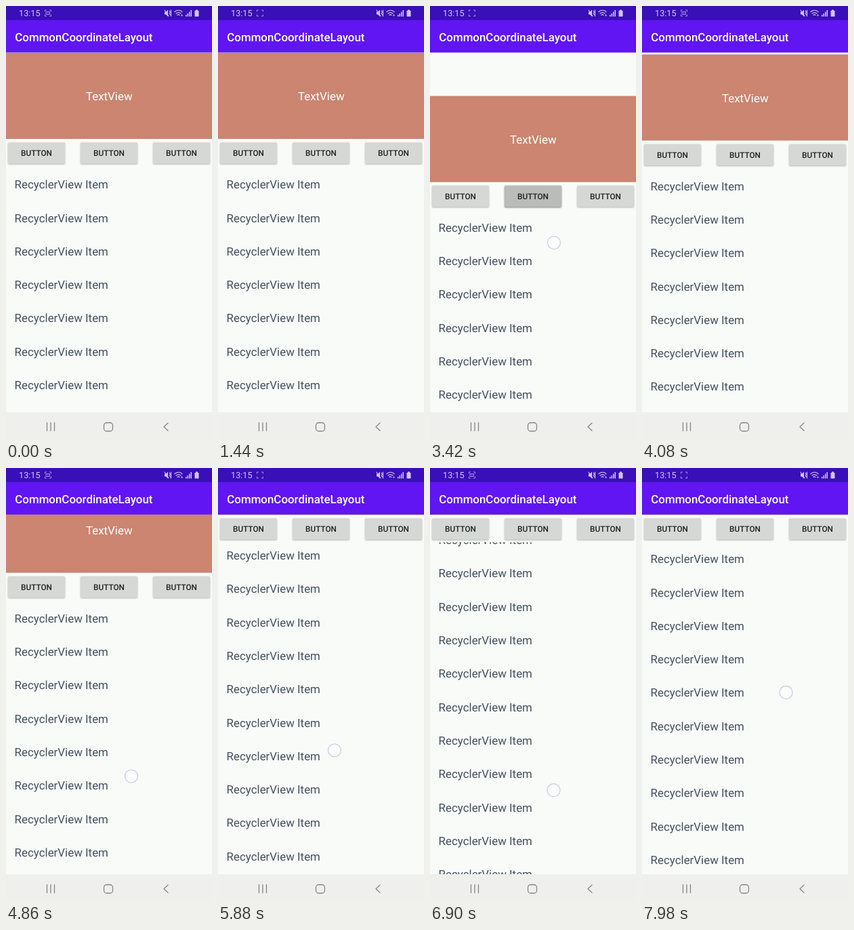
Animation, 304 px wide and 640 px high, one loop 8000 ms. Source, as an HTML page:

```html
<!DOCTYPE html>
<html lang="en">
<head>
<meta charset="utf-8">
<title>Coordinated scrolling</title>
<style>
  html, body { margin: 0; width: 100%; height: 100%; overflow: hidden; background: #f9fbf9; }
  svg { display: block; width: 304px; height: 640px; }
  text { font: 16.9px Roboto, sans-serif; text-rendering: geometricPrecision; }
  .medium { font-weight: 500; }
  .label { font-size: 11.8px; font-weight: 500; fill: #202322; text-anchor: middle; }
  .item { fill: #445260; }
  .line { fill: none; stroke-linecap: round; stroke-linejoin: round; }
</style>
</head>
<body>
<svg viewBox="0 0 304 640">
  <defs>
    <clipPath id="listArea"><rect id="listClip" width="304" height="640"/></clipPath>
    <filter id="soft" x="-10%" y="-20%" width="120%" height="140%"><feGaussianBlur stdDeviation="1"/></filter>
  </defs>
  <rect width="304" height="640" fill="#f9fbf9"/>
  <g clip-path="url(#listArea)"><g id="list"></g></g>

  <g id="header">
    <rect y="69" width="304" height="127" fill="#cb8570"/>
    <text x="152.3" y="139.3" fill="#fff" text-anchor="middle">TextView</text>
    <g id="buttons"></g>
  </g>

  <rect y="20" width="304" height="48.6" fill="#6115f2"/>
  <text class="medium" x="13.3" y="51.7" fill="#fff">CommonCoordinateLayout</text>
  <rect width="304" height="20.7" fill="#390fb7"/>

  <g fill="#d3c6f1" stroke="#d3c6f1" stroke-width="0">
    <text x="19" y="15.2" style="font-size:12.7px">13:15</text>
    <g class="line" stroke-width=".9" opacity=".8">
      <path d="M57.5 8V6h2M64.5 6h2v2M66.5 13v2h-2M59.5 15h-2v-2"/>
      <path id="camera" d="M59.5 8.5h5v4h-5zM61.5 10.5h1"/>
    </g>
    <path d="M234 8.500h2l3-3v10l-3-3h-2z"/>
    <path class="line" stroke-width="1.1" d="M234 6l6 9M241 7l1.5 2-1.5 2 1.5 2M243.5 6v9"/>
    <path class="line" stroke-width="1.2" d="M249 8.500q5.500-4.500 11 0M251 11q3.500-2.800 7 0M253 13.300q1.500-1.200 3 0"/>
    <path d="M258 14.500l1.500-2.500 1.500 2.500z"/>
    <path d="M265 13h1.500v2.500H265zM267.500 11h1.500v4.500h-1.500zM270 8.500h1.500v7H270zM272.500 6h1.500v9.500h-1.500z"/>
    <path d="M278.500 7h1.500V5.500h3V7h1.500v8.500h-6z"/>
  </g>

  <rect y="599" width="304" height="41" fill="#eff0ee"/>
  <g class="line" stroke="#858685" stroke-width="1.3">
    <path d="M60.500 614.500v12M66 614.500v12M71.500 614.500v12"/>
    <rect x="144.500" y="614.500" width="13" height="12.500" rx="4"/>
    <path d="M239 615l-6 5.600 6 5.600"/>
  </g>
  <circle id="finger" r="9.500" fill="#fff" fill-opacity=".8" stroke="#c9cde6" stroke-width="1.3"/>
</svg>

<script>
const LOOP = 8000, STEP = 60, HEADER = 127, PITCH = 49.3, ITEMS = 16;
const $ = id => document.getElementById(id);

$('buttons').innerHTML = [45, 152, 259].map(x => `
  <rect class="shadow" x="${x - 42}" y="202" width="84" height="31.5" rx="1.5" filter="url(#soft)" opacity=".28"/>
  <rect class="face" x="${x - 42}" y="201.2" width="84" height="31.3" rx="1.5" fill="#d6d8d6"/>
  <text class="label" x="${x}" y="221.2">BUTTON</text>`).join('');
const middleFace = document.querySelectorAll('.face')[1];
const middleShadow = document.querySelectorAll('.shadow')[1];

$('list').innerHTML = Array.from({ length: ITEMS }, (_, i) =>
  `<text class="item" x="12.6" y="${269.2 + i * PITCH}">RecyclerView Item</text>`).join('');

// Each drag moves the finger vertically; its distance drives the scroll.
const pull = { start: 2026, end: 3800, x: 183, from: 243, to: 378 };
const drags = [
  pull,
  { start: 4500, end: 5130, x: 185, from: 496, to: 369, power: 2 },
  { start: 5850, end: 6370, x: 172, from: 423.5, to: 299.5 },
  { start: 6640, end: 7350, x: 182.5, from: 430.5, to: 552.5 },
  { start: 7800, end: LOOP, x: 212.5, from: 331, to: 331 }
];

function fingerY({ start, end, from, to, power = 1 }, t) {
  const progress = Math.min(1, Math.max(0, (t - start) / (end - start)));
  return from + (to - from) * progress ** power;
}

// The pull is damped while held and springs back on release.
const pullGain = t => 0.6 * Math.exp(-Math.max(0, t - pull.end) / 80);

const scrollAt = t => drags.reduce((sum, drag) =>
  sum + (drag.from - fingerY(drag, t)) * (drag === pull ? pullGain(t) : 1), 0);

const isTouching = (drag, t) => t >= drag.start - 200 && t <= drag.end + 40;

function draw() {
  const t = Math.floor(performance.now() % LOOP / STEP) * STEP;
  const scroll = scrollAt(t);
  const headerShift = -Math.min(scroll, HEADER);
  const pressed = isTouching(pull, t);

  $('header').setAttribute('transform', `translate(0 ${headerShift})`);
  $('list').setAttribute('transform', `translate(0 ${-scroll})`);
  $('listClip').setAttribute('y', 236.5 + headerShift);
  middleFace.setAttribute('fill', pressed ? '#babcba' : '#d6d8d6');
  middleShadow.setAttribute('opacity', pressed ? 0.5 : 0.28);
  $('camera').setAttribute('visibility', t % 2000 < 1000 ? 'visible' : 'hidden');

  const touch = drags.find(drag => isTouching(drag, t));
  $('finger').setAttribute('visibility', touch ? 'visible' : 'hidden');
  if (touch) {
    $('finger').setAttribute('cx', touch.x);
    $('finger').setAttribute('cy', fingerY(touch, t));
  }
  requestAnimationFrame(draw);
}
draw();
</script>
</body>
</html>
```
